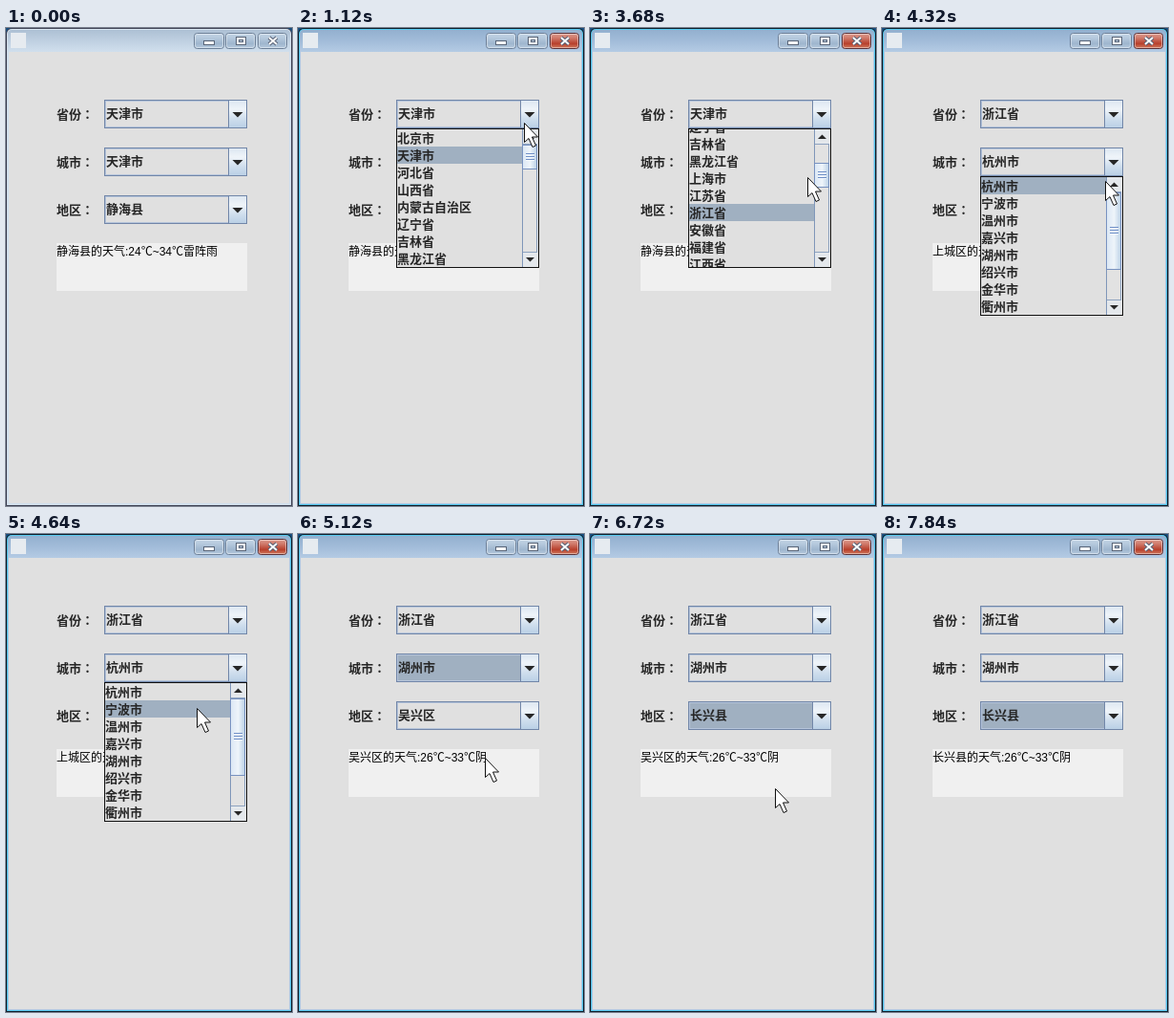
An HTML page with a canvas for the animation above (8480 ms loop, 300 by 500 pixels).

```html
<!DOCTYPE html>
<html lang="zh-CN">
<head>
<meta charset="utf-8">
<title>天气</title>
<style>
  html, body { margin: 0; width: 100%; height: 100%; overflow: hidden; background: #e0e0e0; }
  canvas { display: block; width: 300px; height: 500px; }
</style>
</head>
<body>
<canvas id="stage"></canvas>
<script>
const LOOP = 8480;
const BOLD = 'bold 13px "Noto Sans CJK SC", "Noto Sans CJK", sans-serif';
const COLON = 'bold 13px "Noto Sans CJK JP", "Noto Sans CJK", sans-serif';
const PLAIN = '12px "Liberation Sans", "Noto Sans CJK SC", "Noto Sans CJK", sans-serif';
const INK = '#262626', PANEL = '#e0e0e0', PICKED = '#a0b0c1', EDGE = '#7186a8';
const ROW = 18, LEFT = 103, WIDTH = 150;

const labels = ['省份', '城市', '地区'];
const lists = [
  { items: '北京市 天津市 河北省 山西省 内蒙古自治区 辽宁省 吉林省 黑龙江省 上海市 江苏省 浙江省 安徽省 福建省 江西省'.split(' '), total: 34 },
  { items: '杭州市 宁波市 温州市 嘉兴市 湖州市 绍兴市 金华市 衢州市'.split(' '), total: 11 },
  { items: '吴兴区 南浔区 德清县 长兴县 安吉县'.split(' '), total: 5 }
];

// Each step changes only the listed parts of the state.
const steps = [
  [0, { active: false, values: ['天津市', '天津市', '静海县'], weather: '静海县的天气:24℃~34℃雷阵雨',
        cursor: null, open: -1, pick: 1, scroll: 0, focus: -1, pressed: -1 }],
  [480, { cursor: [228, 88] }],
  [640, { active: true, cursor: [238, 92] }],
  [800, { open: 0, pressed: 0, cursor: [240, 94] }],
  [960, { pressed: -1, cursor: [238, 97] }],
  [1120, { cursor: [237, 99] }],
  [1440, { cursor: [239, 114] }],
  [1600, { cursor: [241, 131] }],
  [1760, { cursor: [243, 141] }],
  [1920, { cursor: [243, 145], scroll: 22 }],
  [2080, { cursor: [243, 151], scroll: 54 }],
  [2240, { cursor: [243, 157], scroll: 86 }],
  [2400, { cursor: [243, 160], scroll: 102 }],
  [2560, { cursor: [222, 207], pick: 11 }],
  [2880, { cursor: [219, 216] }],
  [3040, { cursor: [215, 205] }],
  [3200, { cursor: [213, 193], pick: 10 }],
  [3360, { cursor: [221, 169] }],
  [3680, { cursor: [228, 156] }],
  [3840, { open: -1, focus: 0, scroll: 0, cursor: [249, 138],
           values: ['浙江省', '杭州市', '上城区'], weather: '上城区的天气:26℃~33℃阴' }],
  [4000, { cursor: [245, 140] }],
  [4160, { open: 1, pick: 0, focus: -1, pressed: 1, cursor: [242, 143] }],
  [4320, { pressed: -1, cursor: [234, 160] }],
  [4480, { pick: 1, cursor: [216, 175] }],
  [4640, { cursor: [200, 182] }],
  [4800, { pick: 2, cursor: [196, 205] }],
  [4960, { pick: 4, cursor: [196, 230] }],
  [5120, { open: -1, focus: 1, cursor: [196, 234],
           values: ['浙江省', '湖州市', '吴兴区'], weather: '吴兴区的天气:26℃~33℃阴' }],
  [5440, { cursor: [210, 222] }],
  [5600, { cursor: [232, 200] }],
  [5760, { open: 2, pick: 0, focus: -1, pressed: 2, cursor: [240, 190] }],
  [5920, { cursor: [239, 188] }],
  [6080, { pressed: -1, cursor: [232, 207] }],
  [6240, { pick: 1, cursor: [212, 238] }],
  [6400, { pick: 2, cursor: [198, 258] }],
  [6560, { pick: 3, cursor: [194, 266] }],
  [6720, { open: -1, focus: 2, values: ['浙江省', '湖州市', '长兴县'] }],
  [6880, { weather: '长兴县的天气:26℃~33℃阴', cursor: [189, 254] }],
  [7360, { cursor: [193, 251] }],
  [7520, { cursor: [200, 247] }],
  [7680, { cursor: [207, 243] }],
  [7840, { cursor: null }]
];

const canvas = document.getElementById('stage');
const ctx = canvas.getContext('2d');
const ratio = window.devicePixelRatio || 1;
canvas.width = 300 * ratio;
canvas.height = 500 * ratio;
ctx.scale(ratio, ratio);

function box(x, y, w, h, fill) {
  ctx.fillStyle = fill;
  ctx.fillRect(x, y, w, h);
}

function frame(x, y, w, h, color) {
  ctx.strokeStyle = color;
  ctx.lineWidth = 1;
  ctx.strokeRect(x + .5, y + .5, w - 1, h - 1);
}

function shade(x0, y0, x1, y1, ...colors) {
  const g = ctx.createLinearGradient(x0, y0, x1, y1);
  colors.forEach((c, i) => g.addColorStop(i / (colors.length - 1), c));
  return g;
}

function rounded(x, y, w, h, radii, fill) {
  ctx.beginPath();
  ctx.roundRect(x, y, w, h, radii);
  ctx.fillStyle = fill;
  ctx.fill();
}

function text(str, x, baseline, font = BOLD, color = INK) {
  ctx.font = font;
  ctx.fillStyle = color;
  ctx.fillText(str, x, baseline);
}

function polygon(points, fill) {
  ctx.beginPath();
  points.forEach(([x, y]) => ctx.lineTo(x, y));
  ctx.closePath();
  ctx.fillStyle = fill;
  ctx.fill();
}

function arrow(cx, y, half, dir) {
  polygon([[cx - half, y], [cx + half, y], [cx, y + half * dir]], INK);
}

function titleButton(x, w, red) {
  rounded(x + .5, 5.5, w - 1, 16, 3, red
    ? shade(0, 5, 0, 22, '#dfa396', '#cf7768', '#b8402c', '#d58468')
    : shade(0, 5, 0, 22, '#c6d6e6', '#b4c8dc', '#9fb6ce', '#b9cde0'));
  ctx.strokeStyle = red ? '#5d3238' : '#6d8098';
  ctx.lineWidth = 1;
  ctx.stroke();
  ctx.beginPath();
  ctx.roundRect(x + 1.5, 6.5, w - 3, 14, 2);
  ctx.strokeStyle = 'rgba(255,255,255,.4)';
  ctx.stroke();
}

function closeMark(color, width) {
  ctx.strokeStyle = color;
  ctx.lineWidth = width;
  ctx.beginPath();
  ctx.moveTo(276, 10); ctx.lineTo(284, 17);
  ctx.moveTo(284, 10); ctx.lineTo(276, 17);
  ctx.stroke();
}

function drawWindow(active) {
  box(0, 0, 300, 500, '#174e80');
  rounded(0, 0, 300, 500, [6, 6, 0, 0], active ? '#10202c' : '#45485a');
  rounded(1, 1, 298, 498, [5, 5, 0, 0], active ? '#5accf2' : '#dbe8f3');
  rounded(2, 2, 296, 496, [4, 4, 0, 0], active
    ? shade(0, 2, 0, 25, '#93b0cf', '#a2bcd9', '#b4cbe4')
    : shade(0, 2, 0, 25, '#adc0d4', '#bfd0e1', '#d0dfed'));
  box(3, 25, 294, 472, PANEL);

  box(5, 5, 16, 16, '#e6ebf0');

  titleButton(197, 32, false);
  titleButton(230, 32, false);
  titleButton(264, 31, active);
  box(207, 13, 12, 5, '#596578');
  box(208, 14, 10, 3, '#f4f7fa');
  box(241, 9, 11, 9, '#596578');
  box(242, 10, 9, 7, '#f4f7fa');
  box(244, 12, 5, 3, '#596578');
  box(245, 13, 3, 1, '#b9cbdf');
  closeMark('#566075', 4);
  closeMark('#ffffff', 2);
}

function drawCombo(i, state) {
  const y = 75 + i * 50;
  text(labels[i], 53, y + 20);
  text('：', 79, y + 20, COLON);
  box(LEFT, y, WIDTH, 30, state.focus === i ? PICKED : PANEL);
  frame(LEFT + 1, y + 1, WIDTH - 2, 28, '#b5c4da');
  box(233, y, 20, 30, state.pressed === i
    ? '#a3b8d6' : shade(0, y, 0, y + 30, '#dbe6f1', '#eff4f9', '#cfdeed', '#b8cfe5'));
  box(233, y, 1, 30, EDGE);
  frame(LEFT, y, WIDTH, 30, EDGE);
  arrow(243, y + 13, 5.5, 1);
  text(state.values[i], 105, y + 19);
}

function scrollButton(y, dir) {
  box(236, y, 15, 16, '#e4e8ec');
  box(236, dir > 0 ? y : y + 15, 15, 1, '#8ea3c0');
  arrow(243.5, y + (dir > 0 ? 6 : 10), 4.5, dir);
}

function drawScrollbar(top, total, scroll) {
  const track = top + 17, length = 112, full = total * ROW;
  box(235, top + 1, 17, 144, '#e2e2e2');
  box(235, top + 1, 1, 144, '#7f96b8');
  box(250, top + 1, 1, 144, '#8ea3c0');
  const y = Math.round(track + length * scroll / full);
  const h = Math.round(length * 144 / full);
  box(236, y, 15, h, shade(236, 0, 251, 0, '#dce8f5', '#eef4fa', '#b8cfe5'));
  frame(235, y, 16, h, '#7892c0');
  const mid = y + Math.floor(h / 2);
  for (const d of [-3, 0, 3]) {
    box(239, mid + d - 1, 9, 1, '#6f8fc6');
    box(239, mid + d, 9, 1, '#f4f9ff');
  }
  scrollButton(top + 1, -1);
  scrollButton(top + 129, 1);
}

function drawPopup(i, state) {
  const { items, total } = lists[i];
  const top = 105 + i * 50, height = Math.min(total, 8) * ROW;
  const scrolls = total > 8;
  box(LEFT, top, WIDTH, height + 2, PANEL);
  ctx.save();
  ctx.beginPath();
  ctx.rect(LEFT + 1, top + 1, scrolls ? 131 : 148, height);
  ctx.clip();
  items.forEach((name, n) => {
    const y = top + 1 + n * ROW - state.scroll;
    if (n === state.pick) box(LEFT + 1, y, WIDTH, ROW, PICKED);
    text(name, 104, y + 14);
  });
  ctx.restore();
  if (scrolls) drawScrollbar(top, total, state.scroll);
  frame(LEFT, top, WIDTH, height + 2, '#111');
}

function drawCursor([x, y]) {
  const shape = [[0, 0], [0, 20], [4.5, 16], [8.5, 25], [12, 23.5], [8, 14.5], [14, 14.5]];
  polygon(shape.map(([dx, dy]) => [x + .5 + dx, y + .5 + dy]), '#fff');
  ctx.strokeStyle = '#111';
  ctx.lineWidth = 1;
  ctx.stroke();
}

function stateAt(time) {
  return Object.assign({}, ...steps.filter(([at]) => at <= time).map(([, change]) => change));
}

function draw(time) {
  const state = stateAt(time);
  drawWindow(state.active);
  labels.forEach((_, i) => drawCombo(i, state));
  box(53, 225, 200, 50, '#f0f0f0');
  text(state.weather, 53, 238, PLAIN, '#000');
  if (state.open >= 0) drawPopup(state.open, state);
  if (state.cursor) drawCursor(state.cursor);
}

const start = performance.now();
function tick() {
  draw((performance.now() - start) % LOOP);
  requestAnimationFrame(tick);
}
tick();
</script>
</body>
</html>
```
